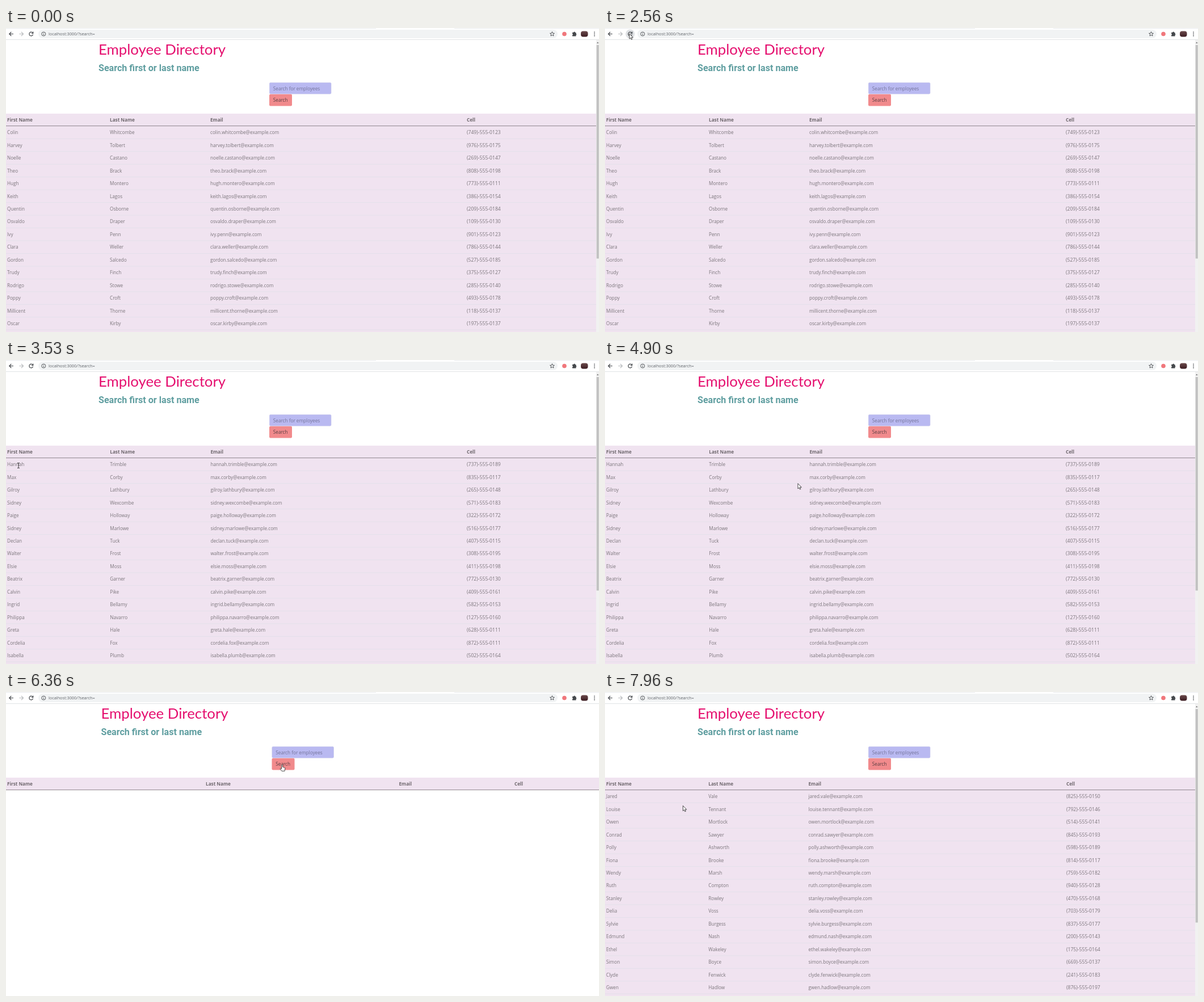
An HTML page for the animation above (8 s loop, 1045 by 536 pixels).

```html
<!DOCTYPE html>
<html lang="en">
<head>
<meta charset="utf-8">
<title>Employee Directory</title>
<style>
  html, body { margin: 0; width: 100%; height: 100%; overflow: hidden; background: #fff; }
  svg { display: block; }
  text { font: 8.2px "Open Sans", "Noto Sans", sans-serif; fill: #7b757b; white-space: pre; }
  .head { font-weight: 700; fill: #6f686e; }
  .cell { font-size: 8.6px; }
  .title { font: 25.8px Lato, sans-serif; fill: #e5106f; }
  .sub { font: 700 16.1px Roboto, sans-serif; fill: #5f9ea0; }
  .url { font-size: 7.3px; fill: #5f6368; }
  .hint { fill: #74749a; }
  .label { fill: #5a3f44; }
  .tip { font-size: 6.7px; }
  .icon { fill: none; stroke: #45484c; stroke-width: 1.2; }
</style>
</head>
<body>
<svg width="1045" height="536" viewBox="0 0 1045 536">
  <defs>
    <linearGradient id="photo" x2="0" y2="1">
      <stop stop-color="#6b4a4c"/><stop offset="1" stop-color="#3c1c22"/>
    </linearGradient>
  </defs>

  <!-- browser bar -->
  <path d="M0 .5H652M790 .5H1045" stroke="#e9ebee"/>
  <rect x="57" y="3" width="915" height="15" rx="7.5" fill="#f1f3f4"/>
  <path d="M0 20.5H1045" stroke="#e1e3e5"/>
  <circle id="hover" cx="44.3" cy="10.5" r="8" fill="#dfe1e4"/>
  <g class="icon">
    <path d="M13 10.5H6M9.3 7 5.8 10.5 9.3 14"/>
    <path d="M23.3 10.5H30.3M27 7 30.5 10.5 27 14" stroke="#b9bbbe"/>
    <path d="M47.1 8.6A3.4 3.4 0 1 0 47.6 11.4M47.8 6.6V9.5H44.9"/>
    <g stroke-width=".9"><circle cx="66.3" cy="10.5" r="3.5"/><path d="M66.3 10V12.6M66.3 8.3V9.2"/></g>
    <path d="M962.5 6.6 963.6 9.2 966.4 9.4 964.3 11.2 965 14 962.5 12.5 960 14 960.7 11.2 958.6 9.4 961.4 9.2Z" stroke-width=".9"/>
  </g>
  <text class="url" x="75" y="13.2">localhost:3000/?search=</text>
  <circle cx="984" cy="10.5" r="3.8" fill="#f0777c"/>
  <path d="M998 8H1000A1.5 1.5 0 0 1 1003 8H1004.5V10A1.4 1.4 0 0 1 1004.5 12.6V14.5H998V12.4A1.3 1.3 0 0 0 998 9.9Z" fill="#45484c"/>
  <rect x="1013" y="5.5" width="12.5" height="10" rx="4" fill="url(#photo)"/>
  <g fill="#45484c"><circle cx="1037" cy="7.3" r=".9"/><circle cx="1037" cy="10.5" r=".9"/><circle cx="1037" cy="13.7" r=".9"/></g>

  <g id="page">
    <text class="title" x="163" y="47">Employee Directory</text>
    <text class="sub" x="163" y="75.9">Search first or last name</text>
    <rect x="464.3" y="96.3" width="108.7" height="20" rx="2" fill="#b9b9f1" stroke="#c9cbea" stroke-width=".6"/>
    <text class="hint" x="470.8" y="109.5">Search for employees</text>
    <rect id="ring" x="463" y="116" width="42" height="22.4" rx="3" fill="none" stroke="#93b9f3" stroke-width="2.2"/>
    <rect x="464" y="116.7" width="40" height="20.8" rx="2" fill="#f18a8c"/>
    <text class="label" x="470.8" y="130.3">Search</text>
  </g>

  <g id="tables"></g>

  <g id="scrollbar">
    <path d="M1040 21H1045V536H1040Z" fill="#f1f1f1"/>
    <path d="M1040.7 30H1044.7V406.5H1040.7Z" fill="#c1c1c1"/>
    <path d="M1041 27 1042.7 24.5 1044.4 27Z" fill="#777"/>
  </g>

  <g id="tip">
    <rect x="48.5" y="18.5" width="57.5" height="14" fill="#fff" stroke="#bbb" stroke-width=".7"/>
    <text class="tip" x="51.5" y="28">Reload this page</text>
  </g>

  <g id="cursor" stroke-linejoin="round">
    <path id="arrow" d="M0 0V9.2L2.1 7.3 3.5 10.4 5 9.7 3.6 6.7H6.4Z" fill="#fff" stroke="#222" stroke-width=".8"/>
    <path id="beam" d="M-2-4.5H-.6L0-4 .6-4.5H2M0-4V4M-2 4.5H-.6L0 4 .6 4.5H2" fill="none" stroke="#222" stroke-width=".9"/>
    <path id="hand" d="M-1 .6Q0-.8 1 .6V4.2L4.6 5.1Q5.4 5.4 5.3 6.4L4.6 11.4H-.6L-3.4 7.4Q-3.2 6-1 7.4Z" fill="#fff" stroke="#222" stroke-width=".8"/>
  </g>
</svg>

<script>
const LOOP = 8000, TICK = 67.5, ROW = 22.467;
const $ = id => document.getElementById(id);
const show = (id, on) => $(id).style.display = on ? '' : 'none';

const text = (x, y, s, cls = '') => `<text x="${x}" y="${y}" class="${cls}">${s}</text>`;

// Seeded generator for the made-up phone numbers
let seed = 7;
const rand = n => (seed = seed * 16807 % 2147483647) % n;
const phone = () => `(${100 + rand(900)})-555-01${10 + rand(90)}`;

function table(id, cols, width, people) {
  const heads = ['First Name', 'Last Name', 'Email', 'Cell'];
  const list = people ? people.split(',') : [];
  let out = `<rect y="151" width="${width}" height="${list.length ? 385 : 22}" fill="#f0e3f0"/>`;
  out += heads.map((h, i) => text(cols[i], 165, h, 'head')).join('');
  list.forEach((person, i) => {
    const [first, last] = person.split(' ');
    const y = 187.2 + i * ROW, line = 195.3 + i * ROW;
    const mail = `${first}.${last}@example.com`.toLowerCase();
    out += text(cols[0], y, first) + text(cols[1], y, last) + text(cols[2], y, mail)
      + text(cols[3], y, phone(), 'cell')
      + `<path d="M0 ${line}H${width}" stroke="#dee0e8" stroke-width=".7"/>`;
  });
  out += `<path d="M0 172.6H${width}" stroke="#857c84" stroke-width=".9"/>`;
  return `<g id="${id}">${out}</g>`;
}

$('tables').innerHTML =
  table('empty', [2, 352, 692.5, 896], 1045) +
  table('list0', [2, 183, 360, 812], 1040,
    'Colin Whitcombe,Harvey Tolbert,Noelle Castano,Theo Brack,Hugh Montero,Keith Lagos,' +
    'Quentin Osborne,Osvaldo Draper,Ivy Penn,Clara Weller,Gordon Salcedo,Trudy Finch,' +
    'Rodrigo Stowe,Poppy Croft,Millicent Thorne,Oscar Kirby') +
  table('list1', [2, 183.3, 360.4, 812], 1040,
    'Hannah Trimble,Max Corby,Gilroy Lathbury,Sidney Wexcombe,Paige Holloway,Sidney Marlowe,' +
    'Declan Tuck,Walter Frost,Elsie Moss,Beatrix Garner,Calvin Pike,Ingrid Bellamy,' +
    'Philippa Navarro,Greta Hale,Cordelia Fox,Isabella Plumb') +
  table('list2', [2, 182.3, 358.5, 813], 1040,
    'Jared Vale,Louise Tennant,Owen Mortlock,Conrad Sawyer,Polly Ashworth,Fiona Brooke,' +
    'Wendy Marsh,Ruth Compton,Stanley Rowley,Delia Voss,Sylvie Burgess,Edmund Nash,' +
    'Ethel Wakeley,Simon Boyce,Clyde Fenwick,Gwen Hadlow');

// Pointer path: time, x, y, shape from then on
const path = [
  [0, 1055, 545, 'arrow'], [510, 1055, 545, 'arrow'], [1000, 300, 150, 'arrow'],
  [1260, 71, 9, 'arrow'], [1330, 41, 10, 'arrow'], [1470, 40, 10, 'arrow'],
  [1610, 41, 10, 'arrow'], [1680, 43, 10, 'arrow'], [3150, 43, 10, 'arrow'],
  [3400, 30, 150, 'beam'], [3510, 22, 186, 'beam'], [3650, 28, 191, 'arrow'],
  [3930, 59, 192, 'arrow'], [4400, 190, 204, 'arrow'], [4770, 323, 215, 'arrow'],
  [5100, 385, 225, 'arrow'], [5400, 450, 180, 'arrow'], [5600, 481, 135, 'hand'],
  [5880, 486.5, 128, 'hand'], [6620, 486.5, 128, 'hand'], [6700, 465, 140, 'arrow'],
  [7100, 190, 185, 'arrow'], [7400, 36, 194, 'arrow'], [7490, 27, 184, 'beam'],
  [7600, 40, 190, 'arrow'], [7940, 151.3, 202, 'arrow'], [LOOP, 151.3, 202, 'arrow']
];

function pointer(t) {
  const i = path.findIndex(p => p[0] > t) - 1;
  const [t0, x0, y0, shape] = path[i], [t1, x1, y1] = path[i + 1];
  const k = (t - t0) / (t1 - t0);
  return [x0 + (x1 - x0) * k, y0 + (y1 - y0) * k, shape];
}

function frame(now) {
  const t = now % LOOP, within = (a, b) => t >= a && t < b;
  const loading = within(2630, 2700) || within(6360, 6420);
  const list = t < 2630 ? 0 : t < 6360 ? 1 : 2;
  show('empty', loading);
  for (let i = 0; i < 3; i++) show('list' + i, !loading && i === list);
  show('scrollbar', !loading);
  $('page').setAttribute('transform', `translate(${loading ? 4.5 : 0})`);
  show('hover', within(1330, 2910));
  show('tip', within(2210, 2430));
  show('ring', within(6080, 6360));

  const [x, y, shape] = pointer(Math.floor(t / TICK) * TICK);
  $('cursor').setAttribute('transform', `translate(${x} ${y})`);
  for (const s of ['arrow', 'beam', 'hand']) show(s, s === shape);
  requestAnimationFrame(frame);
}
requestAnimationFrame(frame);
</script>
</body>
</html>
```
